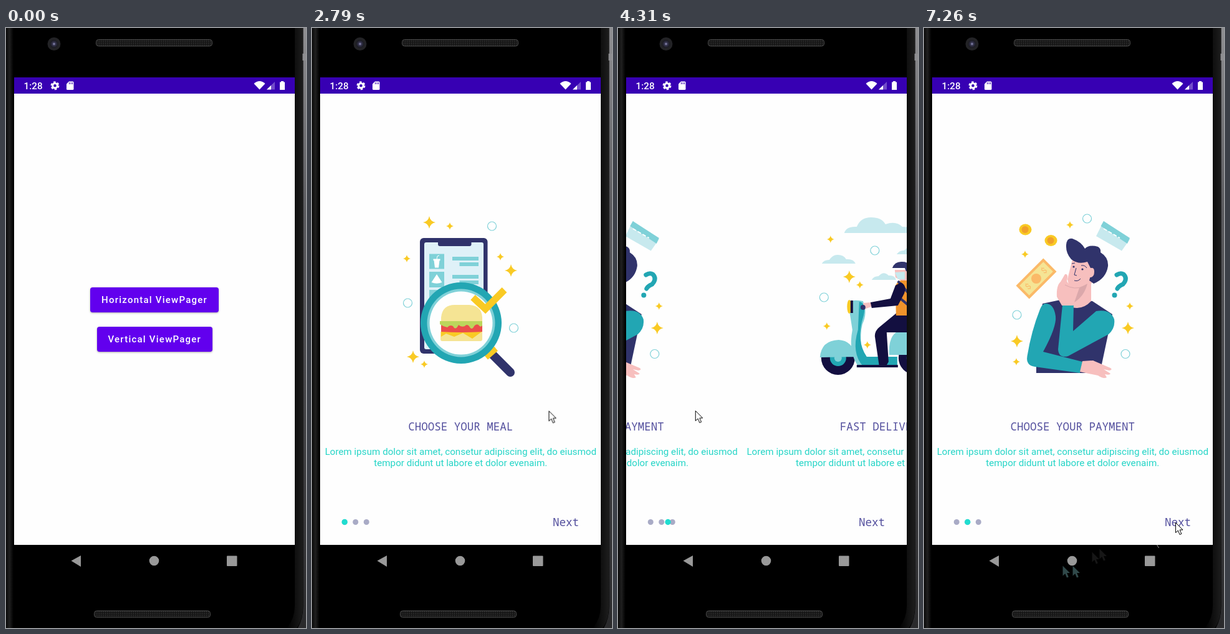
Recreate the animation shown at these times as an HTML page. Size 481x960 px, loop 7990 ms.

```html
<!DOCTYPE html>
<html lang="en">
<head>
<meta charset="utf-8">
<title>ViewPager demo</title>
<style>
@property --page { syntax: "<number>"; inherits: true; initial-value: 0; }
html, body { margin: 0; width: 100%; height: 100%; overflow: hidden; background: #000; }
#stage { position: relative; width: 481px; height: 960px; overflow: hidden; background: #000; }
#stage svg { position: absolute; left: 0; top: 0; overflow: visible; }
.screen { position: absolute; left: 13px; top: 79px; width: 450px; height: 747.5px; }
.loop { animation: 7.99s linear infinite; }

#home { position: absolute; inset: 26px 0 0; background: #fefefe; animation-name: exit; }
#dim { background: #000; opacity: 0; animation-name: dim; }
.button {
  position: absolute; display: flex; align-items: center; justify-content: center; overflow: hidden;
  height: 39.5px; border-radius: 4px; background: #6200ee; color: #fff;
  font: 500 15px Roboto, sans-serif; letter-spacing: 1.22px; white-space: nowrap;
  box-shadow: 0 1px 3px rgba(0,0,0,.35);
}
#ripple {
  position: absolute; left: -55px; top: -195px; width: 440px; height: 440px; border-radius: 50%;
  background: #fff; opacity: 0; animation-name: ripple;
}

#pager { overflow: visible; background: #fefefe; animation-name: enter, reveal, pages; }
#view { position: absolute; top: 26px; width: 450px; height: 649px; overflow: hidden; }
#strip { position: absolute; width: 1350px; height: 649px; transform: translateX(calc(var(--page) * -450px)); }
#strip svg:nth-child(2) { left: 450px; }
#strip svg:nth-child(3) { left: 900px; }
#dot { transform: translateX(calc(var(--page) * 17.5px)); }
.glow { transform: scaleX(0); transform-origin: 0 0; }
#glowStart { animation-name: glowStart; }
#glowEnd { animation-name: glowEnd; }
.title { font: 17.5px "Noto Sans Mono", "DejaVu Sans Mono", monospace; fill: #54509e; }
.body { font: 15.2px Roboto, sans-serif; fill: #25d5c7; }
.mid { text-anchor: middle; }

#cursor { animation-name: cursor; }
#trail { opacity: 0; animation-name: trail; animation-timing-function: step-end; }

@keyframes exit {
  0%, 25.67% { transform: none; animation-timing-function: cubic-bezier(.4,0,.2,1); }
  30.99%, 100% { transform: translateY(-20px); }
}
@keyframes dim { 0%, 25.67% { opacity: 0; } 26.8%, 100% { opacity: .105; } }
@keyframes enter {
  0%, 25.67% { transform: translateY(30.6px); animation-timing-function: cubic-bezier(.4,0,.2,1); }
  30.99%, 100% { transform: none; }
}
@keyframes reveal {
  0%, 25.66% { clip-path: inset(100% 0 0); }
  25.67% { clip-path: inset(95.9% 0 0); animation-timing-function: cubic-bezier(.3,0,.8,.15); }
  26.56% { clip-path: inset(57.5% 0 0); animation-timing-function: cubic-bezier(.05,.7,.1,1); }
  30.99%, 100% { clip-path: inset(0 0 0); }
}
@keyframes pages {
  0%, 41.6% { --page: 0; }
  41.8% { --page: .001; animation-timing-function: ease-in; }
  44.43% { --page: .45; animation-timing-function: ease-out; }
  47.8%, 51.2% { --page: 1; }
  53.95% { --page: 1.586; animation-timing-function: ease-out; }
  57.07%, 62.4% { --page: 2; }
  66% { --page: 1.149; animation-timing-function: ease-out; }
  67.5%, 68.2% { --page: 1; }
  71.6%, 86.1% { --page: 0; animation-timing-function: ease-out; }
  90%, 100% { --page: 1; }
}
@keyframes ripple {
  0%, 20.2% { transform: scale(.1); opacity: 0; }
  20.3% { transform: scale(.15); opacity: .24; }
  22% { transform: scale(1); opacity: .2; }
  22.8%, 100% { transform: scale(1); opacity: 0; }
}
@keyframes glowEnd { 0%, 58% { transform: scaleX(0); } 60.7% { transform: scaleX(.9); } 62.6%, 100% { transform: scaleX(0); } }
@keyframes glowStart {
  0%, 72.4% { transform: scaleX(0); }
  74.6%, 76.3% { transform: scaleX(1); }
  80%, 100% { transform: scaleX(0); }
}
@keyframes cursor {
  0%, 2.37% { transform: translate(500px, 990px); }
  2.38% { transform: translate(432px, 940px); animation-timing-function: ease-out; }
  11.76% { transform: translate(302px, 446px); }
  12.64%, 15.2% { transform: translate(301px, 443px); }
  16.9%, 24.6% { transform: translate(299px, 438px); }
  27.28% { transform: translate(349px, 525px); }
  34% { transform: translate(380px, 612px); }
  41.8% { transform: translate(375px, 615px); }
  45.5% { transform: translate(130px, 618px); }
  50.8% { transform: translate(386px, 616px); }
  53.94% { transform: translate(124px, 612px); }
  55% { transform: translate(105px, 614px); }
  57.7% { transform: translate(380px, 620px); }
  60.7% { transform: translate(150px, 630px); }
  62.4% { transform: translate(100px, 635px); }
  65.96% { transform: translate(300px, 638px); }
  68% { transform: translate(110px, 700px); }
  71% { transform: translate(290px, 770px); }
  72.3% { transform: translate(130px, 800px); }
  74.6% { transform: translate(269px, 839px); }
  76.4% { transform: translate(238px, 860px); }
  78.2% { transform: translate(222px, 860px); }
  82% { transform: translate(281px, 833px); }
  85% { transform: translate(375px, 825px); }
  86.5% { transform: translate(405px, 799px); }
  88%, 100% { transform: translate(403px, 791px); }
}
@keyframes trail { 0% { opacity: 0; } 85.5%, 100% { opacity: 1; } }
</style>
</head>
<body>
<div id="stage">
  <svg width="481" height="960" viewBox="0 0 481 960">
    <defs>
      <linearGradient id="left"><stop stop-color="#080808"/><stop offset=".45" stop-color="#202020"/><stop offset="1" stop-color="#000"/></linearGradient>
      <linearGradient id="right"><stop stop-color="#000"/><stop offset="1" stop-color="#1d1d1d"/></linearGradient>
      <linearGradient id="edge" x2="0" y2="1"><stop stop-color="#8e8e91"/><stop offset=".3" stop-color="#5a5a5e"/><stop offset="1" stop-color="#2a2a2c"/></linearGradient>
      <radialGradient id="lens"><stop stop-color="#9a98c4"/><stop offset=".4" stop-color="#34334c"/><stop offset="1" stop-color="#17171c"/></radialGradient>
      <pattern id="mesh" width="3" height="3" patternUnits="userSpaceOnUse"><path fill="#161616" d="M0 0h3v3H0z"/><path fill="#343434" d="M0 0h1v2H0z"/></pattern>
      <path id="star" d="M0-10Q1.5-1.5 10 0Q1.5 1.5 0 10Q-1.5 1.5-10 0Q-1.5-1.5 0-10Z" fill="#f9ca24"/>
      <path id="arrow" d="M.5.5V16.5L4.3 13L7 19.5L9.8 18.3L7.1 12H12Z"/>
      <g id="status" fill="#fff">
        <path fill="#3700b3" d="M13 79h450v26H13z"/>
        <text x="28.5" y="98" font-family="Roboto, sans-serif" font-weight="500" font-size="15.3">1:28</text>
        <g fill="none" stroke="#fff"><circle cx="78.5" cy="92.3" r="3.8" stroke-width="3"/><circle cx="78.5" cy="92.3" r="5.8" stroke-width="2.4" stroke-dasharray="3.4 2.67"/></g>
        <path d="M101 85.500H107Q108.500 85.500 108.500 87V97.500Q108.500 99 107 99H98.500Q97 99 97 97.500V89.500Z"/>
        <path stroke="#3700b3" d="M101.500 87v3M104 87v3M106.400 87v3"/>
        <path d="M397.500 89Q406.500 81 415.500 89L406.500 98.500Z"/>
        <path opacity=".3" d="M418 98.500H431V86Z"/><path d="M418 98.500H425V91.700Z"/>
        <path d="M441 85h4v1.500h2V99h-8V86.500h2z"/>
      </g>
    </defs>
    <path fill="url(#left)" d="M0 0h12v960H0z"/>
    <path fill="url(#right)" d="M463 0h13V925Q476 948 466 960H450Q463 945 463 925Z"/>
    <path fill="url(#edge)" d="M476.500 0h4.500v960h-13Q476.500 945 476.500 925Z"/>
    <path fill="#8e8e91" d="M475.500 41h5.500v11h-5.500z"/>
    <circle cx="77" cy="25.500" r="10.500" fill="#232326"/><circle cx="77" cy="25.500" r="6.500" fill="url(#lens)"/>
    <g fill="url(#mesh)" stroke="#4a4a4a"><rect x="144.500" y="18.500" width="186" height="10.500" rx="4"/><rect x="141.500" y="932.500" width="186" height="10.500" rx="4"/></g>
    <g fill="#999"><path d="M104.500 852.500L120 844V862Z"/><circle cx="237.500" cy="852.500" r="7.800"/><rect x="354" y="844.500" width="16.500" height="16.500" rx="1"/></g>
    <use href="#status"/>
  </svg>

  <div class="screen">
    <div id="home" class="loop">
      <div class="button" style="left:122px;top:310px;width:206px">Horizontal ViewPager<i id="ripple" class="loop"></i></div>
      <div class="button" style="left:132.500px;top:373px;width:185.500px">Vertical ViewPager</div>
    </div>
  </div>
  <div id="dim" class="screen loop"></div>

  <div id="pager" class="screen loop">
    <div id="view">
      <div id="strip">
        <svg width="450" height="649" viewBox="13 105 450 649" data-title="CHOOSE YOUR MEAL"
             data-stars="188,311,10 221,317,6 152,369,6 302,366,6 319,388,10 162,526,10 180,538,6" data-rings="288.5,317 153.5,440 323.5,480">
          <rect x="173" y="336" width="108.500" height="185" rx="6" fill="#30336b"/>
          <rect x="180" y="343" width="95" height="171" rx="3" fill="#dff1f8"/>
          <path fill="#30336b" d="M202 340h53.500v6q0 3-3 3h-47.500q-3 0-3-3z"/>
          <path fill="#7fd1d8" d="M188 361.500h24v24h-24zM188 390h24v25h-24zM188 419h24v24h-24zM225 366h42v6h-42zM236.500 375h30.500v6h-30.500zM225 395h42v6h-42zM236.500 404h30.500v6h-30.500z"/>
          <path fill="#fff" d="M194.500 369.500h11v2.500h-1l-1.500 11.500h-6l-1.500-11.500h-1zM191.500 407l8.500-13 8.500 13q-8.500 3.500-17 0z"/>
          <path fill="none" stroke="#fff" d="M200 370l1-5 3-1"/>
          <path fill="none" stroke="#30336b" stroke-width="14" stroke-linecap="round" d="M288 521L318 551"/>
          <path stroke="#f9ca24" stroke-width="9" d="M279 527L295 513"/>
          <circle cx="239" cy="472" r="65" fill="#22a6b3"/><circle cx="239" cy="472" r="54.500" fill="#7fd1d8"/><circle cx="239" cy="472" r="50.500" fill="#fefefe"/>
          <path fill="#f5e494" d="M207 470V463Q209 443 229 443H252Q272 444 273 463V470ZM206 486H273V498Q273 501 270 501H209Q206 501 206 498Z"/>
          <path fill="#f9ca24" d="M207 486H272L257 497 242 488 228 494 215 489 207 494Z"/>
          <path fill="#eb4d4b" d="M207 473H273V486Q240 488 207 486Z"/>
          <path fill="#bcd65c" d="M205 469H273V476Q270 480 267 475 263 473 260 477 256 485 252 477 248 473 245 477 239 479 235 475 230 485 226 477 221 474 217 479 211 478 205 474Z"/>
          <path fill="none" stroke="#f9ca24" stroke-width="11" d="M258 431L278 449.500 308.500 419"/>
        </svg>

        <svg width="450" height="649" viewBox="13 105 450 649" data-title="CHOOSE YOUR PAYMENT"
             data-stars="234,315,6 162,362,6 330,445,6 327,480,10 149,501,10 148,534,6" data-rings="261.5,305 149,459 323,521.5">
          <g fill="#f9ca24"><ellipse cx="162.500" cy="322.500" rx="10" ry="9"/><ellipse cx="203.500" cy="340" rx="10" ry="9"/></g>
          <g fill="#f0a02b"><circle cx="162" cy="322.500" r="5.500"/><circle cx="203" cy="340" r="5.500"/></g>
          <path fill="#c7e9ee" d="M288 309L330 338 317 356.500 276 333Z"/><path fill="#7fd1d8" d="M288 309L330 336 326 345 283.500 317Z"/>
          <path stroke="#fff" stroke-width="1.800" stroke-dasharray="6 3" d="M288 321L314 336"/>
          <g transform="translate(180 401) rotate(-45)">
            <path fill="#fbb968" d="M-31-15h62v30h-62z"/><path fill="#f5e494" d="M-27-11h54v22h-54z"/><circle r="8" fill="#fbb968"/>
            <g class="mid" font-family="Roboto, sans-serif" font-size="13" fill="#fbb968"><text x="-18" y="4">$</text><text x="18" y="4">$</text></g>
          </g>
          <path fill="none" stroke="#22a6b3" stroke-width="7" stroke-linecap="round" d="M309 395Q315 391 320 394 327 401 319 410 312 413 310 417"/><circle cx="305.500" cy="427.500" r="4" fill="#22a6b3"/>
          <path fill="#30336b" d="M190 441L228 433 270 437 302 458 282 552H180V532Z"/>
          <path fill="#f7bfbe" d="M230 402L238 370Q262 360 277 385L268 410V437Q255 451 238 447L234 420Z"/>
          <path fill="#dba8ab" d="M241 439Q257 429 262 409L249 416Z"/>
          <path fill="#30336b" d="M228 347Q229 335 238 337 252 342 258 353 265 346 279 350 284 353 283 359 296 367 295 381 292 401 272 409L265 404 269 388 262 374Q247 379 236 370 227 360 228 347Z"/>
          <path fill="#f7bfbe" d="M265 385q8-4 8 5t-7 9z"/>
          <path fill="#22a6b3" d="M194 441Q208 440 211 461 213 478 191 518L254 534 250 552 178 542Q163 540 165.500 525 172 485 186 450 189 442 194 441Z"/>
          <path fill="#22a6b3" d="M222 443H240L239 485 276 453Q299 449 305 466 307 480 296 490L231 525Q216 529 215 514Z"/>
          <path fill="#f7bfbe" d="M213 430Q212 412 219 406L226 394Q232 392 229 405 232 412 242 414 247 417 236 421L240 444H221Z"/>
          <path fill="#f7bfbe" d="M254 533L271 532 299 544Q303 547 297 548L288 546 299 553Q298 556 290 554L293 559Q288 562 279 556L250 550Z"/>
          <g fill="#30336b"><circle cx="240" cy="382" r="1.600"/><circle cx="254" cy="386" r="1.600"/></g>
          <path fill="none" stroke="#30336b" d="M237 377l5-1M252 380q6-1 9 4M244 384l-3 11 4 1M241 404q6 2 10-3"/>
          <path fill="none" stroke="#dba8ab" d="M226 411q16 9 30 2"/>
        </svg>

        <svg width="450" height="649" viewBox="13 105 450 649" data-title="FAST DELIVERY"
             data-stars="155,338,6 185,398,10 202,411,6 149,477,6 214,507,6" data-rings="226,356 144.5,431 330,440">
          <path fill="#c7e9ee" d="M177 328Q180 317 197 318 203 303 220 303 237 303 243 314 260 308 270 318 287 318 290 328ZM141 377Q144 371 153 371 159 362 167 363 176 363 180 370 192 369 195 377ZM221 403Q224 397 232 397 240 388 248 396 258 395 260 403ZM261 362Q266 355 273 356 285 343 297 354 311 353 314 362Z"/>
          <path fill="#7fd1d8" d="M298 412h40v42h-40z"/><path fill="#22a6b3" d="M298 412h40v8h-40z"/>
          <g fill="#130f40"><circle cx="167" cy="528" r="27"/><circle cx="290" cy="528" r="26"/></g>
          <g fill="#22a6b3"><circle cx="167" cy="528" r="13"/><circle cx="290" cy="528" r="13"/></g>
          <g fill="#7fd1d8"><circle cx="167" cy="528" r="6"/><circle cx="290" cy="528" r="6"/>
            <path d="M138 527Q140 500 168 499 190 500 196 526ZM183 438Q192 434 207 437 215 455 206 474 198 508 215 542H200Q183 520 190 483Z"/>
            <path d="M249 523Q247 485 272 483H318Q326 500 321 523Z"/>
          </g>
          <path fill="#22a6b3" d="M201 438Q213 440 208 460 195 500 213 526H262V541H207Q188 520 199 483Z"/>
          <path fill="none" stroke="#130f40" stroke-width="4" d="M197 541H263"/>
          <path fill="#130f40" d="M262 455H293V487H245L248 534 244 541H233L226 493Q226 484 234 478Z"/>
          <path fill="#f0932b" d="M259 412Q264 401 282 402 296 405 298 430L295 460H260Z"/>
          <path fill="none" stroke="#30336b" stroke-width="4" d="M260 427L284 447M263 405L292 438"/>
          <path fill="#f7bfbe" d="M258 387h22v17h-12l-9-5zM207 440l13-1 3 6-14 5z"/>
          <path fill="#c7e9ee" d="M258 391l16-1v12h-11z"/>
          <path fill="#30336b" d="M254 384Q258 373 270 374 284 374 284 390L276 389 274 384Z"/>
          <path fill="#130f40" d="M268 407Q278 412 273 425L263 444 221 448 219 439 251 433 259 412Z"/>
          <ellipse cx="185" cy="446" rx="3.500" ry="11" fill="#f9ca24"/><path fill="#130f40" d="M187 436h4v20h-4z"/><circle cx="207" cy="447" r="4" fill="#30336b"/>
        </svg>
      </div>
      <svg width="450" height="649" viewBox="0 0 450 649" fill="#e7e7e8" style="mix-blend-mode:multiply">
        <path id="glowStart" class="glow loop" d="M0 0H22A1250 1250 0 0 1 22 649H0Z"/>
        <g transform="translate(450) scale(-1 1)"><path id="glowEnd" class="glow loop" d="M0 0H22A1250 1250 0 0 1 22 649H0Z"/></g>
      </svg>
    </div>
    <svg width="450" height="747" viewBox="13 79 450 747">
      <use href="#status"/>
      <g fill="#a9abc6"><circle cx="52.300" cy="790.500" r="4.500"/><circle cx="69.800" cy="790.500" r="4.500"/><circle cx="87.300" cy="790.500" r="4.500"/></g>
      <circle id="dot" cx="52.300" cy="790.500" r="4.700" fill="#20ddd0"/>
      <text class="title" x="386" y="797">Next</text>
    </svg>
  </div>

  <svg width="481" height="960" viewBox="0 0 481 960">
    <g id="trail" class="loop"><g fill="#30494a"><use href="#arrow" x="222" y="860"/><use href="#arrow" x="238" y="860"/></g><g fill="#161616"><use href="#arrow" x="269" y="838"/><use href="#arrow" x="281" y="833"/></g><path stroke="#999" d="M373.500 827l3 5"/></g>
    <g id="cursor" class="loop" fill="#fff" stroke="#000"><use href="#arrow"/></g>
  </svg>
</div>
<script>
const points = list => list.split(" ").map(item => item.split(","));
const caption = (style, y, text) => `<text class="mid ${style}" x="238.300" y="${y}">${text}</text>`;

for (const page of document.querySelectorAll("#strip svg")) {
  const { title, stars, rings } = page.dataset;
  page.innerHTML +=
    points(stars).map(([x, y, r]) => `<use href="#star" transform="translate(${x} ${y}) scale(${r / 10})"/>`).join("") +
    points(rings).map(([x, y]) => `<circle cx="${x}" cy="${y}" r="7" fill="none" stroke="#7fd1d8" stroke-width="1.200"/>`).join("") +
    caption("title", 644, title) +
    caption("body", 683, "Lorem ipsum dolor sit amet, consetur adipiscing elit, do eiusmod") +
    caption("body", 701, "tempor didunt ut labore et dolor evenaim.");
}
</script>
</body>
</html>
```
